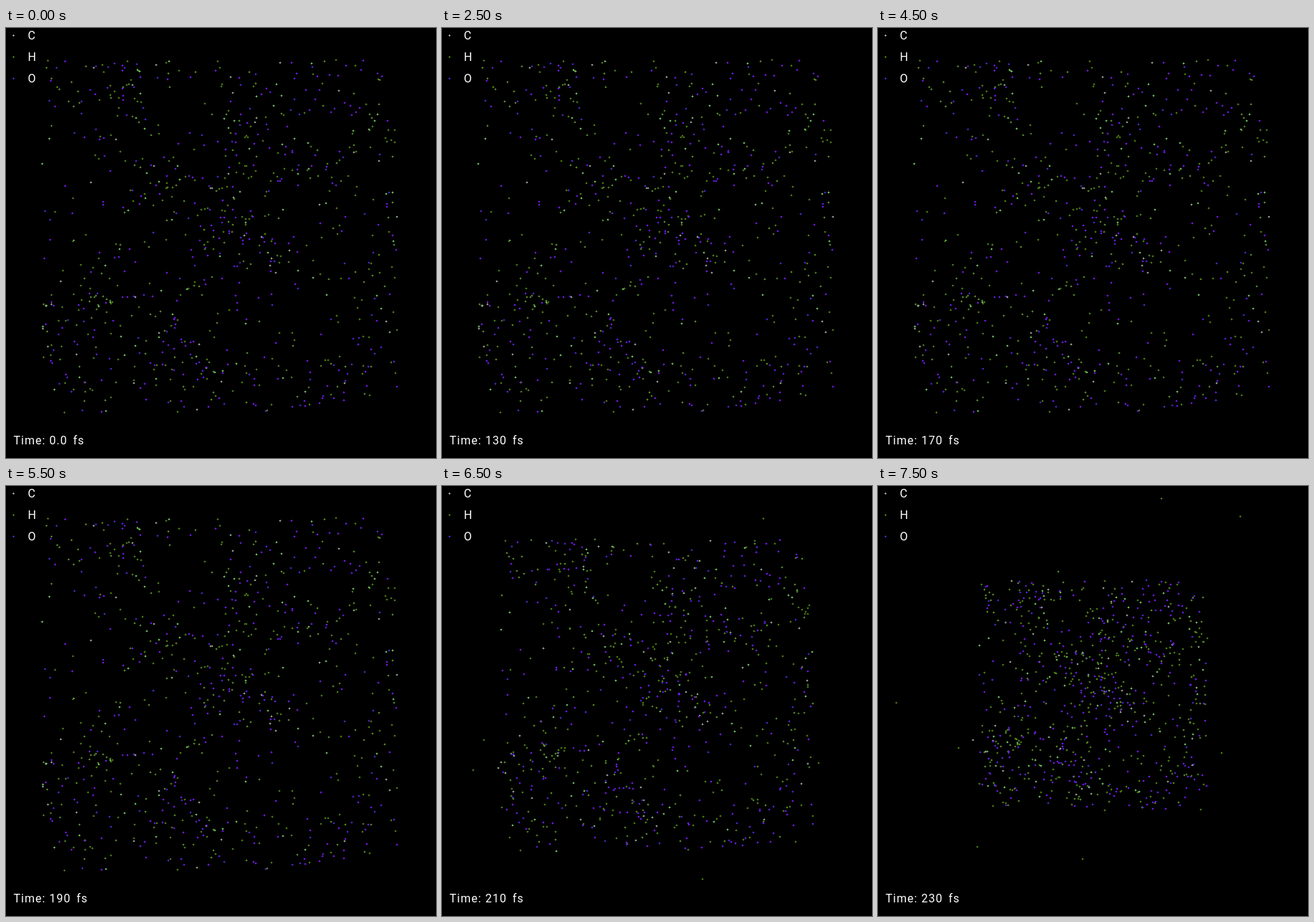
Recreate the animation shown at these times as an HTML page with a canvas. Size 600 px wide and 600 px high, loop 8000 ms.

```html
<!DOCTYPE html>
<html lang="en">
<head>
<meta charset="utf-8">
<title>Particle simulation</title>
<style>
html, body { margin: 0; width: 100%; height: 100%; overflow: hidden; background: #000; }
canvas { display: block; width: 600px; height: 600px; }
</style>
</head>
<body>
<canvas id="stage" width="600" height="600"></canvas>
<script>
const ctx = document.getElementById('stage').getContext('2d');

const LOOP = 8000, STEP = 500, LAST_STILL = 11;
const MID_X = 297.5, MID_Y = 291.5, HALF = 248, COUNT = 840;
const ZOOM = [1, 0.995, 0.88, 0.723, 0.642];

const KINDS = {
  C: { colors: ['#68b860', '#68b860', '#8c9c88'], reach: 1.6 },
  H: { colors: ['#487814', '#487814', '#548428'], reach: 2 },
  O: { colors: ['#6c1ae0', '#6c1ae0', '#5222c4'], reach: 1.3 }
};

// Crowded and empty areas: x, y, radius
const CROWDS = [
  [335, 165, 50], [275, 260, 50], [365, 300, 35], [170, 75, 35],
  [95, 385, 50], [260, 465, 40], [205, 215, 40]
];
const VOIDS = [
  [80, 190, 60], [80, 275, 40], [265, 130, 38], [215, 325, 40],
  [400, 260, 35], [415, 400, 40], [335, 430, 40]
];

// Free atoms: offset from the middle and speed per step
const STRAYS = [
  [159, -354, -10, -74], [-351, 44, -76, -27], [-292, 117, 0, -2],
  [268, 116, 12, 9], [25, 324, -47, 32], [340, -354, -20, -35],
  [-243, 278, -9, 52]
];

let seed = 20417;
function rand() {
  seed = (seed + 0x6d2b79f5) | 0;
  let n = Math.imul(seed ^ (seed >>> 15), 1 | seed);
  n = (n + Math.imul(n ^ (n >>> 7), 61 | n)) ^ n;
  return ((n ^ (n >>> 14)) >>> 0) / 4294967296;
}
const spread = () => rand() + rand() + rand() - 1.5;

function nearness(areas, x, y) {
  return Math.max(...areas.map(([cx, cy, r]) =>
    Math.exp(-((x - cx) ** 2 + (y - cy) ** 2) / (r * r))));
}

function pickKind() {
  const r = rand();
  return r < 0.4 ? KINDS.O : r < 0.54 ? KINDS.C : KINDS.H;
}

function makeAtom() {
  let x, y, chance;
  do {
    x = MID_X + (rand() * 2 - 1) * HALF;
    y = MID_Y + (rand() * 2 - 1) * HALF;
    chance = (0.36 + 0.64 * nearness(CROWDS, x, y)) * (1 - nearness(VOIDS, x, y));
  } while (rand() > chance);
  const { colors, reach } = pickKind();
  return {
    x: x - MID_X, y: y - MID_Y,
    dx: spread() * reach, dy: spread() * reach,
    loose: rand() < 0.2,
    color: colors[Math.floor(rand() * colors.length)]
  };
}

const atoms = Array.from({ length: COUNT }, makeAtom);

function dot(x, y, color) {
  x = Math.round(x);
  y = Math.round(y);
  ctx.fillStyle = color;
  ctx.fillRect(x - 1, y, 3, 1);
  ctx.fillRect(x, y - 1, 1, 3);
}

// Most atoms bounce back at the box edge, loose ones leak out
function shift(p, d, loose) {
  return !loose && Math.abs(p + d) > HALF ? p - d : p + d;
}

function label(text, x, y) {
  ctx.fillStyle = '#fff';
  ctx.fillText(text, x, y);
}

function drawLegend() {
  [['C', '#a4a8a4'], ['H', '#487814'], ['O', '#5222c4']].forEach(([name, color], i) => {
    dot(10, 10 + i * 30, color);
    label(name, 30.5, 16 + i * 30);
  });
}

function drawTime(step) {
  const value = step ? String(80 + step * 10) : '0.0';
  label('Time:', 10.5, 581);
  label(value, 60.5, 581);
  label('fs', 68.5 + ctx.measureText(value).width, 581);
}

function draw(step) {
  const k = Math.max(0, step - LAST_STILL);
  const zoom = ZOOM[k], drift = Math.max(0, 5 * k - 3);
  const cx = MID_X + Math.min(k, 2), cy = MID_Y;
  const plot = (x, y, color) => dot(cx + x * zoom, cy + y * zoom, color);

  ctx.fillStyle = '#000';
  ctx.fillRect(0, 0, 600, 600);
  for (const a of atoms) {
    plot(shift(a.x, a.dx * drift, a.loose), shift(a.y, a.dy * drift, a.loose), a.color);
  }
  if (k > 1) {
    for (const [x, y, vx, vy] of STRAYS) {
      plot(x + vx * (k - 3), y + vy * (k - 3), KINDS.H.colors[0]);
    }
  }
  drawLegend();
  drawTime(step);
}

ctx.font = '400 16px Roboto, "Open Sans", sans-serif';
ctx.letterSpacing = '1px';

function tick() {
  draw(Math.floor((performance.now() % LOOP) / STEP));
  requestAnimationFrame(tick);
}
tick();
</script>
</body>
</html>
```
